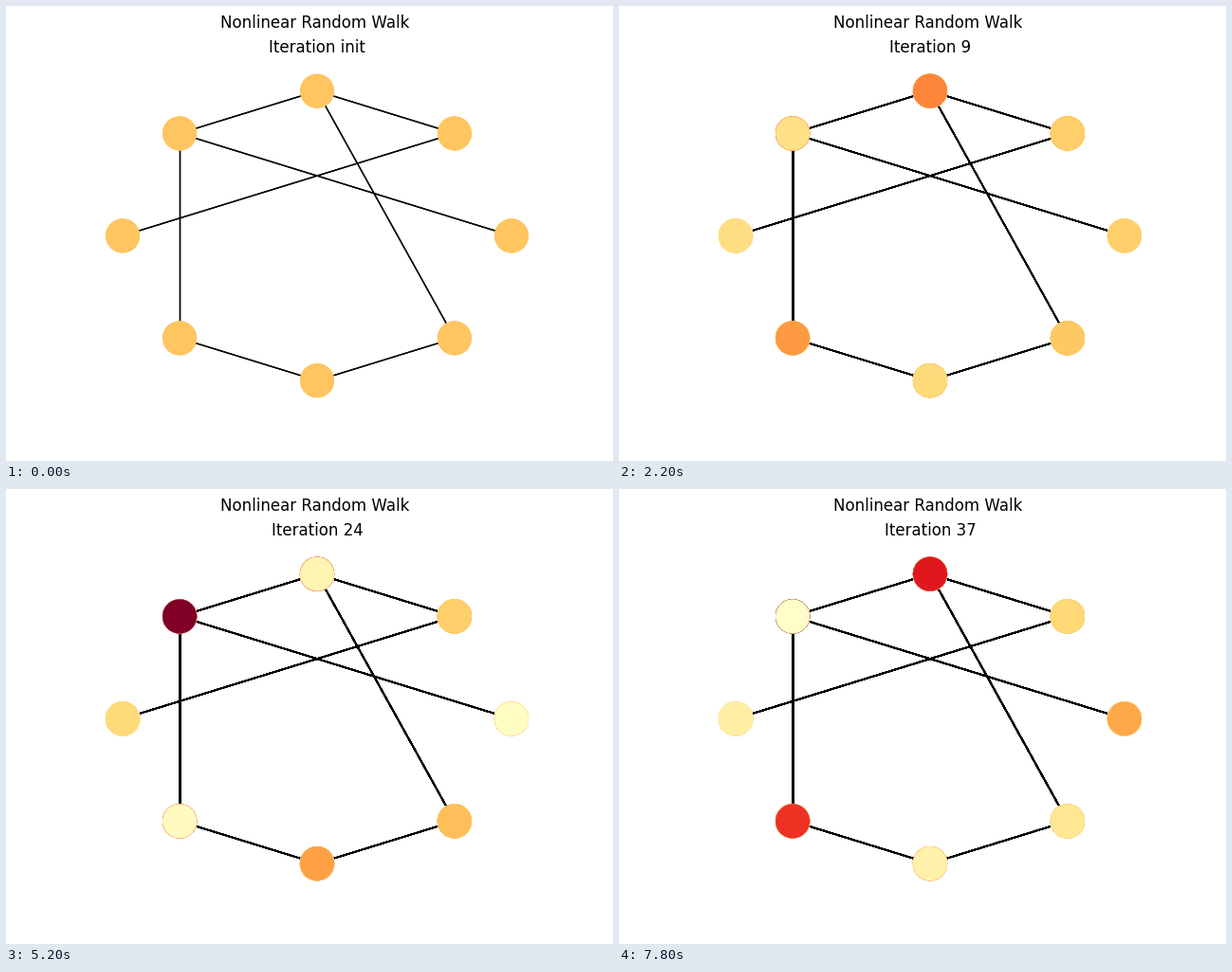
Write a matplotlib script that moves like this. It is 640 px wide and 480 px high and loops after 8000 ms.

```python
import matplotlib.pyplot as plt
import numpy as np
from matplotlib.animation import FuncAnimation
from matplotlib.collections import LineCollection

FRAMES, INTERVAL = 40, 200
ALPHA = -7.0      # negative bias: walkers avoid crowded nodes
VMAX = 0.4
EDGES = [(0, 3), (1, 2), (1, 4), (2, 3), (2, 7), (3, 5), (5, 6), (6, 7)]
N = 8

adj = np.zeros((N, N))
for a, b in EDGES:
    adj[a, b] = adj[b, a] = 1

angle = 2 * np.pi * np.arange(N) / N
pos = np.column_stack([np.cos(angle), np.sin(angle)])


def step(p):
    """Move the density once; column j holds the moves out of node j."""
    w = adj * np.exp(ALPHA * p)[:, None]
    return (w / w.sum(axis=0)) @ p


states = [np.full(N, 1 / N)]
for _ in range(FRAMES):
    states.append(step(states[-1]))

fig, ax = plt.subplots(figsize=(6.4, 4.8), dpi=100)
ax.axis("off")


def add_layer(p):
    lines = LineCollection([(pos[a], pos[b]) for a, b in EDGES],
                           colors="k", linewidths=1.0, zorder=1)
    ax.add_collection(lines)
    nodes = ax.scatter(pos[:, 0], pos[:, 1], s=625, c=p, cmap="YlOrRd",
                       vmin=0, vmax=VMAX, linewidths=1.0,
                       edgecolors="face", zorder=2)
    return lines, nodes


# Each frame is painted over the earlier ones; the start is painted three times.
layers = [add_layer(states[max(0, j - 2)]) for j in range(FRAMES + 1)]
ax.set_xlim(-1.21, 1.21)
ax.set_ylim(-1.21, 1.21)
title = ax.set_title("", fontsize=12, linespacing=1.6)


def update(k):
    for j, layer in enumerate(layers):
        for artist in layer:
            artist.set_visible(j <= k + 1)
    label = "init" if k < 2 else k - 2
    title.set_text(f"Nonlinear Random Walk \nIteration {label}")
    return [title]


anim = FuncAnimation(fig, update, frames=FRAMES, interval=INTERVAL,
                     init_func=lambda: update(0), repeat=True, repeat_delay=0)
plt.show()
```
